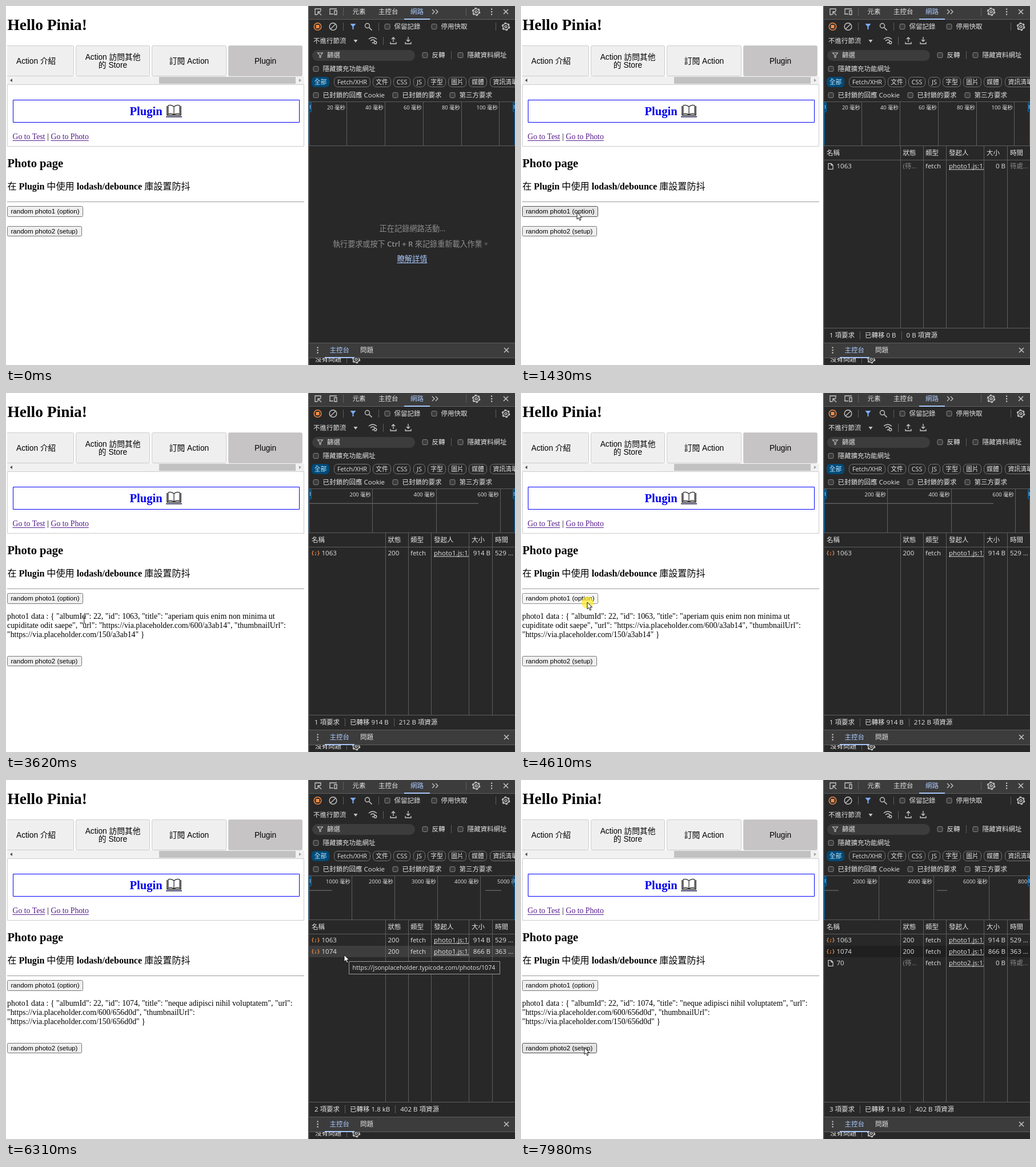
An HTML page with a canvas for the animation above (8 s loop, 891 by 628 pixels).

```html
<!DOCTYPE html>
<html lang="zh-Hant">
<head>
<meta charset="utf-8">
<title>Hello Pinia!</title>
<style>
html, body { margin: 0; width: 100%; height: 100%; overflow: hidden; background: #fff; }
canvas { display: block; }
</style>
</head>
<body>
<canvas id="stage" width="891" height="628"></canvas>
<script>
const c = document.getElementById('stage').getContext('2d');
const LOOP = 8000, TAU = Math.PI * 2;
const CJK = '"Noto Sans CJK TC","Noto Sans CJK JP","Noto Sans CJK",';
const ui = (s, w = '') => `${w} ${s}px "Open Sans",${CJK}sans-serif`;
const serif = (s, w = '') => `${w} ${s}px "Liberation Serif",${CJK}serif`;
const arial = s => `${s}px "Liberation Sans",${CJK}sans-serif`;
const UI = ui(11.5), FG = '#e3e3e3', ICON = '#c7c7c7', DIM = '#8a8a8a', LINE = '#5e5e5e';
const BLUE = '#a8c7fa', ORANGE = '#f08d4c', PANEL = '#282828', BAR = '#3c3c3c';

function txt(s, x, y, font = UI, color = FG, align = 'left') {
  c.font = font;
  c.fillStyle = color;
  c.textAlign = align;
  c.fillText(s, x, y);
  return c.measureText(s).width;
}

// Runs of [text, font] laid out one after another
function flow(runs, x, y, color) {
  runs.forEach(([s, font]) => x += txt(s, x, y, font, color));
}

function box(x, y, w, h, color) {
  c.fillStyle = color;
  c.fillRect(x, y, w, h);
}

function round(x, y, w, h, r, fill, stroke) {
  c.beginPath();
  c.roundRect(x, y, w, h, r);
  if (fill) { c.fillStyle = fill; c.fill(); }
  if (stroke) { c.strokeStyle = stroke; c.lineWidth = 1; c.stroke(); }
}

// SVG path drawn around a point
function icon(d, x, y, stroke = ICON, fill = null, width = 1.3) {
  const p = new Path2D(d);
  c.save();
  c.translate(x, y);
  if (fill) { c.fillStyle = fill; c.fill(p); }
  if (stroke) { c.strokeStyle = stroke; c.lineWidth = width; c.stroke(p); }
  c.restore();
}

function ring(x, y, r, color = ICON, width = 1.4, dash = []) {
  c.beginPath();
  c.arc(x, y, r, 0, TAU);
  c.setLineDash(dash);
  c.strokeStyle = color;
  c.lineWidth = width;
  c.stroke();
  c.setLineDash([]);
}

function clipped(x, y, w, h, draw) {
  c.save();
  c.beginPath();
  c.rect(x, y, w, h);
  c.clip();
  draw();
  c.restore();
}

function gear(x, y) {
  ring(x, y, 5.2, ICON, 1.5);
  ring(x, y, 6.5, ICON, 1.6, [3.4, 3.4]);
  ring(x, y, 1.9, ICON, 1.4);
}

const dots = (x, y) => [-4.5, 0, 4.5].forEach(d => box(x - 1, y + d - 1, 2.2, 2.2, ICON));
const cross = (x, y) => icon('M-4-4L4 4M4-4L-4 4', x, y, ICON, null, 1.5);
const divider = (x, y) => box(x, y - 7, 1, 14, LINE);
const FUNNEL = 'M-5-5H5L1 0V5H-1V0Z';

function check(x, y, label) {
  round(x - 4.5, y - 4.5, 9, 9, 2, '#3b3b3b', '#858585');
  txt(label, x + 12, y + 4);
}

// Network timeline
const hasData = t => t >= 1960;
const requests = [
  { id: '1063', from: 1430, done: 2030, js: 'photo1.js:13', size: '914 B', time: '529 …' },
  { id: '1074', from: 5560, done: 5900, js: 'photo1.js:13', size: '866 B', time: '363 …' },
  { id: '70', from: 7850, done: Infinity, js: 'photo2.js:12', size: '', time: '' }
];

function axisAt(t) {
  if (t < 2030) return { px: 66.75, ms: 20, bars: [] };
  if (t < 5560) return { px: 111.8, ms: 200, bars: [[531, 827]] };
  if (t < 7850) return { px: 75.15, ms: 1000, bars: t < 5900 ? [[531, 571]] : [[531, 571], [839, 867]] };
  return { px: 96.4, ms: 2000, bars: [[531, 556], [728, 746]] };
}

function photoLines(t) {
  if (!hasData(t)) return [];
  if (t < 5830) return [
    'photo1 data : { "albumId": 22, "id": 1063, "title": "aperiam quis enim non minima ut',
    'cupiditate odit saepe", "url": "https://via.placeholder.com/600/a3ab14", "thumbnailUrl":',
    '"https://via.placeholder.com/150/a3ab14" }'];
  return [
    'photo1 data : { "albumId": 22, "id": 1074, "title": "neque adipisci nihil voluptatem", "url":',
    '"https://via.placeholder.com/600/656d0d", "thumbnailUrl":',
    '"https://via.placeholder.com/150/656d0d" }'];
}

// Pointer strokes as [time, x, y] points
const moves = [
  [[70, 458, 432], [350, 270, 350], [560, 140, 306], [840, 98, 361]],
  [[2460, 98, 361], [2800, 330, 335], [3000, 560, 291], [3220, 600, 283]],
  [[3350, 600, 283], [3480, 440, 350], [3616, 137, 397], [3750, 110, 402], [4150, 116, 366]],
  [[4750, 116, 366], [5000, 140, 362], [5283, 179, 353], [5490, 605, 304]],
  [[5560, 605, 304], [6010, 592, 306]],
  [[6570, 592, 306], [6800, 400, 400], [7000, 150, 472], [7170, 111, 468]]
];
const clicks = [[970, 1110], [4210, 4290], [4370, 4530], [4610, 4750], [7370, 7500]];
const TICK = 66.7;

function pointerAt(t) {
  const pts = moves.filter(m => m[0][0] <= t).pop();
  if (!pts) return null;
  const end = pts[pts.length - 1], start = pts[0][0];
  if (t >= end[0]) return { x: end[1], y: end[2] };
  const q = start + Math.floor((t - start) / TICK) * TICK;
  const i = pts.findIndex(p => p[0] > q);
  const [t0, x0, y0] = pts[i - 1], [t1, x1, y1] = pts[i];
  const k = (q - t0) / (t1 - t0);
  return { x: x0 + (x1 - x0) * k, y: y0 + (y1 - y0) * k };
}

const inside = (p, x, y, w, h) => p && p.x >= x && p.x < x + w && p.y >= y && p.y < y + h;

function button(label, y, w, h, p, down) {
  const over = inside(p, 2, y, w, h);
  const [bg, edge] = over ? (down ? ['#f5f5f5', '#8d8d8d'] : ['#e5e5e5', '#4f4f4f']) : ['#efefef', '#767676'];
  round(2.5, y + 0.5, w - 1, h - 1, 2, bg, edge);
  txt(label, 8.5, y + 13, arial(11.55), '#000');
}

function link(s, x) {
  const w = txt(s, x, 233, serif(13.71), '#551a8b');
  box(x, 235, w, 1, '#551a8b');
}

function tab(x, w, lines, active) {
  round(x + 0.5, 69.5, w - 1, 53, 2, active ? '#c6c4c4' : '#efefef', '#ccc');
  lines.forEach((s, i) =>
    txt(s, x + w / 2, 101 - (lines.length - 1) * 7 + i * 14, arial(13.71), '#000', 'center'));
}

function book(x, y) {
  icon('M-12-8V8H12V-8', x, y, '#111', '#fff', 1.4);
  icon('M0-7Q-5-11-10-9V6Q-5 4 0 7Q5 4 10 6V-9Q5-11 0-7V7', x, y, '#222', '#fff', 1.2);
  box(x - 14, y + 10, 28, 1.5, '#114');
}

function page(t, p, down) {
  box(0, 0, 530, 628, '#fff');
  txt('Hello Pinia!', 2.5, 42, serif(27.43, 'bold'), '#000');
  clipped(2, 60, 520, 64, () => {
    tab(-12, 131, []);
    txt('Action 介紹', 18, 101, arial(13.71), '#000');
    tab(122, 130, ['Action 訪問其他', '的 Store']);
    tab(255, 131, ['訂閱 Action']);
    tab(389, 130, ['Plugin'], true);
  });
  box(2, 123, 520, 14, '#f1f1f1');
  box(268, 124, 239, 12, '#c1c1c1');
  icon('M2-3V3L-2 0Z', 9, 130, null, '#505050');
  icon('M-2-3V3L2 0Z', 515, 130, null, '#a3a3a3');
  round(2.5, 137.5, 519, 108, 0, null, '#ccc');
  round(12.5, 164.5, 501, 39, 0, null, '#00f');
  txt('Plugin', 216.5, 191, serif(20.57, 'bold'), '#00e');
  book(294, 183);
  link('Go to Test', 11.5);
  txt('|', 72.2, 233, serif(13.71), '#000');
  link('Go to Photo', 78.5);
  txt('Photo page', 2.5, 282, serif(20.57, 'bold'), '#000');
  const latin = serif(16.1, 'bold'), han = serif(16.1, '500');
  flow([['在', han], [' Plugin ', latin], ['中使用', han], [' lodash/debounce ', latin], ['庫設置防抖', han]],
    2.5, 321, '#000');
  box(2, 342, 520, 1, '#9a9a9a');
  button('random photo1 (option)', 350, 133, 19, p, down);
  photoLines(t).forEach((s, i) => txt(s, 2, 395 + i * 16, serif(13.88), '#000'));
  button('random photo2 (setup)', hasData(t) ? 460 : 385, 131, 18, p, down);
}

function toolbars() {
  box(530, 0, 361, 628, PANEL);
  box(530, 0, 361, 23, BAR);
  box(530, 23, 361, 1, LINE);
  icon('M-1 5H-5V-5H5V-1M0 0L6 6M0 5V0H5', 546, 10);
  icon('M-6 4V-5H6M-7 4H0M2-2H6V5H2Z', 573, 10);
  divider(590, 10);
  txt('元素', 606.5, 14);
  txt('主控台', 652, 14);
  txt('網路', 708, 14, UI, BLUE);
  box(697, 22, 45, 2, BLUE);
  icon('M-5-4L-1 0L-5 4M1-4L5 0L1 4', 751, 10);
  divider(805, 10);
  gear(823, 10);
  dots(850, 10);
  cross(875, 10);

  ring(545.5, 36, 6.3, ORANGE, 1.5);
  box(542.5, 33, 6, 6, ORANGE);
  ring(572.5, 36, 6.3);
  icon('M-4 4L4-4', 572.5, 36);
  divider(590, 36);
  icon(FUNNEL, 607.5, 36, null, '#7cacf8');
  ring(632.5, 34.5, 4);
  icon('M0 0L5 5', 635.5, 37.5, ICON, null, 1.6);
  divider(652, 36);
  check(667.5, 36, '保留記錄');
  check(749.5, 36, '停用快取');
  divider(857, 36);
  gear(875, 36);

  txt('不進行節流', 538, 65);
  icon('M-3.5-2H3.5L0 3Z', 612, 61, null, ICON);
  icon('M-7-2Q0-8 7-2M-4 1Q0-3 4 1M-1 4L0 5L1 3', 642, 60);
  ring(646.5, 64, 2.2);
  divider(660, 61);
  icon('M0 3V-5M-3-2L0-5L3-2M-5 3V6H5V3', 678, 60);
  icon('M0 2V-6M-3-1L0 2L3-1M-5 3V6H5V3', 704, 60);

  round(536, 77, 180, 19, 9.5, BAR);
  icon('M-4.5-4H4.5L1 0V4H-1V0Z', 550, 86, ICON, null, 1.1);
  txt('篩選', 562, 90);
  check(733.5, 86, '反轉');
  divider(779, 86);
  check(795.5, 86, '隱藏資料網址');
  check(542.5, 110, '隱藏擴充功能網址');

  round(535, 124, 31, 18, 6, '#004a77');
  txt('全部', 550.5, 137, ui(10.8), '#c2e7ff', 'center');
  [['Fetch/XHR', 574, 64], ['文件', 642, 32], ['CSS', 678, 30], ['JS', 713, 21],
   ['字型', 738, 32], ['圖片', 774, 32], ['媒體', 810, 32], ['資訊清單', 847, 54]].forEach(([s, x, w]) => {
    round(x + 0.5, 124.5, w - 1, 17, 6, null, '#757575');
    txt(s, x + w / 2, 137, ui(10.8), FG, 'center');
  });
  check(542.5, 156, '已封鎖的回應 Cookie');
  check(681.5, 156, '已封鎖的要求');
  check(781.5, 156, '第三方要求');
}

function overview(t) {
  const { px, ms, bars } = axisAt(t);
  box(530, 167, 361, 1, LINE);
  box(530, 244, 361, 1, LINE);
  for (let k = 1; k < 6; k++) {
    const x = Math.floor(530 + px * k);
    box(x, 168, 1, 76, LINE);
    txt(`${k * ms} 毫秒`, x - 2, 181, ui(9.45), FG, 'right');
  }
  bars.forEach(([a, b]) => box(a, 192.5, b - a, 1.5, LINE));
  [530, 890].forEach(x => box(x, 168, 1.5, 76, '#0b6fb0'));
  [530, 887].forEach(x => {
    round(x + 0.5, 168.5, 4, 17, 2, '#004a77', '#0b6fb0');
    box(x + 2, 173, 1, 7, BLUE);
  });
}

function emptyPanel() {
  const grey = '#8f8f8f', font = ui(13.1);
  txt('正在記錄網路活動…', 711.5, 394, ui(13.2), grey, 'center');
  flow([['執行要求或按下 ', font], ['Ctrl + R', ui(13.1, '600')], [' 來記錄重新載入作業。', font]], 572, 421, grey);
  txt('瞭解詳情', 711, 447, ui(13.2), BLUE, 'center');
  box(684.5, 449, 53, 1, BLUE);
}

function row(r, i, t, p) {
  const top = 270 + i * 20, y = top + 14, done = t >= r.done;
  const over = inside(p, 531, top, 360, 20);
  box(531, top, 360, 20, over ? '#3d3d3d' : i % 2 ? '#1f1f1f' : PANEL);
  if (done) txt('{;}', 542, y - 1, 'bold 8.5px "DejaVu Sans Mono",monospace', ORANGE, 'center');
  else icon('M-4-5H1L4-2V5H-4ZM1-5V-2H4', 542, top + 10.5, FG, null, 1.1);
  txt(r.id, 552.5, y);
  txt(done ? '200' : '(待…', 668.5, y, UI, done ? FG : DIM);
  txt('fetch', 708, y);
  clipped(745, top, 65, 20, () => {
    const w = txt(r.js, 749, y);
    box(749, y + 1.5, w, 1, FG);
  });
  txt(done ? r.size : '0 B', 848, y, UI, FG, 'right');
  txt(done ? r.time : '待處…', 856, y, UI, done ? FG : DIM);
}

function table(t, p) {
  const rows = requests.filter(r => t >= r.from);
  if (!rows.length) return emptyPanel();
  const heads = ['名稱', '狀態', '類型', '發起人', '大小', '時間'];
  [535, 668.5, 708, 749, 815, 856].forEach((x, i) => txt(heads[i], x, 261));
  rows.forEach((r, i) => row(r, i, t, p));
  box(530, 269, 361, 1, LINE);
  [664, 704, 744, 810, 851].forEach(x => box(x, 245, 1, 318, LINE));
  box(530, 563, 361, 1, LINE);
  const done = rows.filter(r => t >= r.done).length;
  let x = 540;
  [`${rows.length} 項要求`, '已轉移 ' + ['0 B', '914 B', '1.8 kB'][done], ['0 B', '212 B', '402 B'][done] + ' 項資源']
    .forEach((s, i) => {
      if (i) divider(Math.round(x - 9), 576);
      x += txt(s, x, 580) + 18;
    });
}

function drawer() {
  clipped(530, 615, 361, 13, () => {
    txt('沒有問題', 541, 622);
    divider(596, 618);
    gear(613, 618);
  });
  box(530, 589, 361, 26, BAR);
  box(530, 589, 361, 1, LINE);
  box(530, 615, 361, 1, LINE);
  dots(545.5, 602);
  txt('主控台', 566.5, 606, UI, BLUE);
  box(558, 614, 52, 2, BLUE);
  txt('問題', 620, 606);
  cross(876, 602);
}

function tooltip() {
  round(600.5, 317.5, 264, 22, 0, PANEL, '#9a9a9a');
  txt('https://jsonplaceholder.typicode.com/photos/1074', 606.5, 332, ui(10.56));
}

function pointer(p, t, down) {
  if (down) {
    c.beginPath();
    c.arc(p.x + 0.5, p.y + 0.5, 10.5, 0, TAU);
    c.fillStyle = 'rgba(255, 235, 40, 0.7)';
    c.fill();
  }
  const onText = inside(p, 2, 263, 99, 25) || inside(p, 2, 306, 322, 20) ||
    (hasData(t) && inside(p, 2, 383, 498, 48));
  if (onText) icon('M-3-6H-1L0-5L1-6H3M0-5V5M-3 6H-1L0 5L1 6H3', p.x, p.y, '#222', null, 1);
  else icon('M0 0V12L2.8 9.5L4.8 14L6.8 13L4.9 8.8H8.6Z', p.x, p.y, '#111', '#fff', 1);
}

function draw(t) {
  const p = pointerAt(t);
  const down = clicks.some(([a, b]) => t >= a && t < b);
  page(t, p, down);
  toolbars();
  box(529, 0, 2, 628, '#4a4a4a');
  overview(t);
  table(t, p);
  drawer();
  if (t >= 6310 && t < 6570) tooltip();
  if (p) pointer(p, t, down);
}

const start = performance.now();
function frame() {
  draw((performance.now() - start) % LOOP);
  requestAnimationFrame(frame);
}
frame();
</script>
</body>
</html>
```
